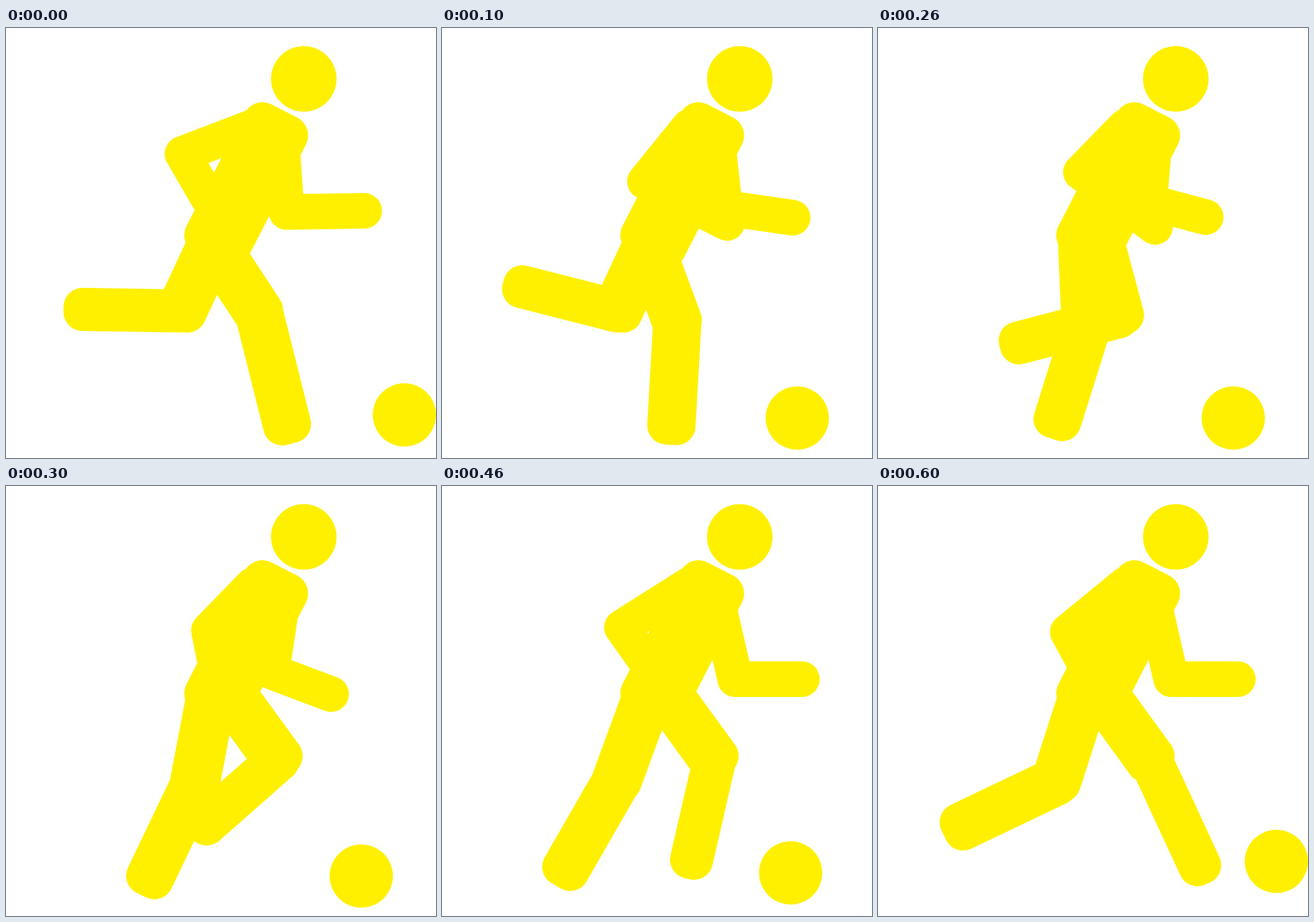
An HTML page with a canvas for the animation above (700 ms loop, 748 px wide and 748 px high).

```html
<!DOCTYPE html>
<html lang="en">
<head>
<meta charset="utf-8">
<title>Runner with ball</title>
<style>
html, body { margin: 0; width: 100%; height: 100%; overflow: hidden; background: #fff; }
canvas { display: block; }
</style>
</head>
<body>
<canvas id="stage" width="748" height="748"></canvas>
<script>
const ctx = document.getElementById('stage').getContext('2d');
const STEP = 100, POSES = 7;
const ARM = 62, ROUND = 33;

// Fixed joints of the leaning body
const neck = [468.3, 175.5], seat = [367.3, 372];
const rearShoulder = [430, 172], frontShoulder = [480, 204];
const stanceHip = [356.5, 369], swingHip = [376, 341];

// Rear arm: the hand rests at the waist except when it swings through
const waist = [367, 322];
const tucked = [353, 251], raised = [313, 246];
const rearElbow = [[307, 219], [353, 267], tucked, tucked, raised, raised, [330, 254]];
const rearHand = [waist, [496, 339], [482, 346], waist, waist, waist, waist];

// Front arm
const low = [510, 336], level = [626, 336];
const frontElbow = [[488, 320], [492, 313], [472, 303], [462, 323], low, low, low];
const frontHand = [[623, 318], [610, 330], [570, 329], [565.5, 362], level, [621, 320], level];

// Legs: knees circle the hips, feet follow their path
const stanceAngle = [33.4, 20.3, 2.4, -10.7, -20.1, -30, -17.8];
const stanceFoot = [[489, 691], [399, 692], [312, 683], [250, 682], [215, 667], [163, 644.5], [144, 593]];
const swingAngle = pose => Math.min(36, Math.max(-25, 40 * pose - 65));
const swingFoot = [[133, 489.5], [138.5, 450], [244, 548], [346, 589], [434, 651], [513, 675], [560, 661.5]];

const resting = [618, 678.5];
const ball = [[693, 673], resting, resting, resting, [606.5, 673], [613, 659], [693, 653]];

// Point at a distance from a joint; 0 degrees hangs straight down
function swing([x, y], length, degrees) {
  const a = degrees * Math.PI / 180;
  return [x + length * Math.sin(a), y + length * Math.cos(a)];
}

function bar([x1, y1], [x2, y2], w, round = ROUND) {
  const r = Math.min(round, w / 2);
  ctx.save();
  ctx.translate(x1, y1);
  ctx.rotate(Math.atan2(y2 - y1, x2 - x1));
  ctx.roundRect(-r, -w / 2, Math.hypot(x2 - x1, y2 - y1) + 2 * r, w, r);
  ctx.restore();
}

function limb(root, joint, end, upper, lower) {
  bar(root, joint, upper);
  bar(joint, end, lower);
}

function disc([x, y], r) {
  ctx.moveTo(x + r, y);
  ctx.arc(x, y, r, 0, 2 * Math.PI);
}

function draw(pose) {
  ctx.fillStyle = '#fff';
  ctx.fillRect(0, 0, 748, 748);
  ctx.fillStyle = '#fff000';
  ctx.beginPath();
  disc([518, 88.5], 57);
  disc(ball[pose], 55);
  bar(neck, seat, 120, 35);
  limb(rearShoulder, rearElbow[pose], rearHand[pose], ARM, ARM);
  limb(frontShoulder, frontElbow[pose], frontHand[pose], ARM, ARM);
  limb(stanceHip, swing(stanceHip, 152, stanceAngle[pose]), stanceFoot[pose], 87, 84);
  limb(swingHip, swing(swingHip, 167, swingAngle(pose)), swingFoot[pose], 88, 75);
  ctx.fill();
}

const start = performance.now();
function tick() {
  const t = performance.now() - start;
  draw(Math.floor(t / STEP) % POSES);
  requestAnimationFrame(tick);
}
tick();
</script>
</body>
</html>
```
